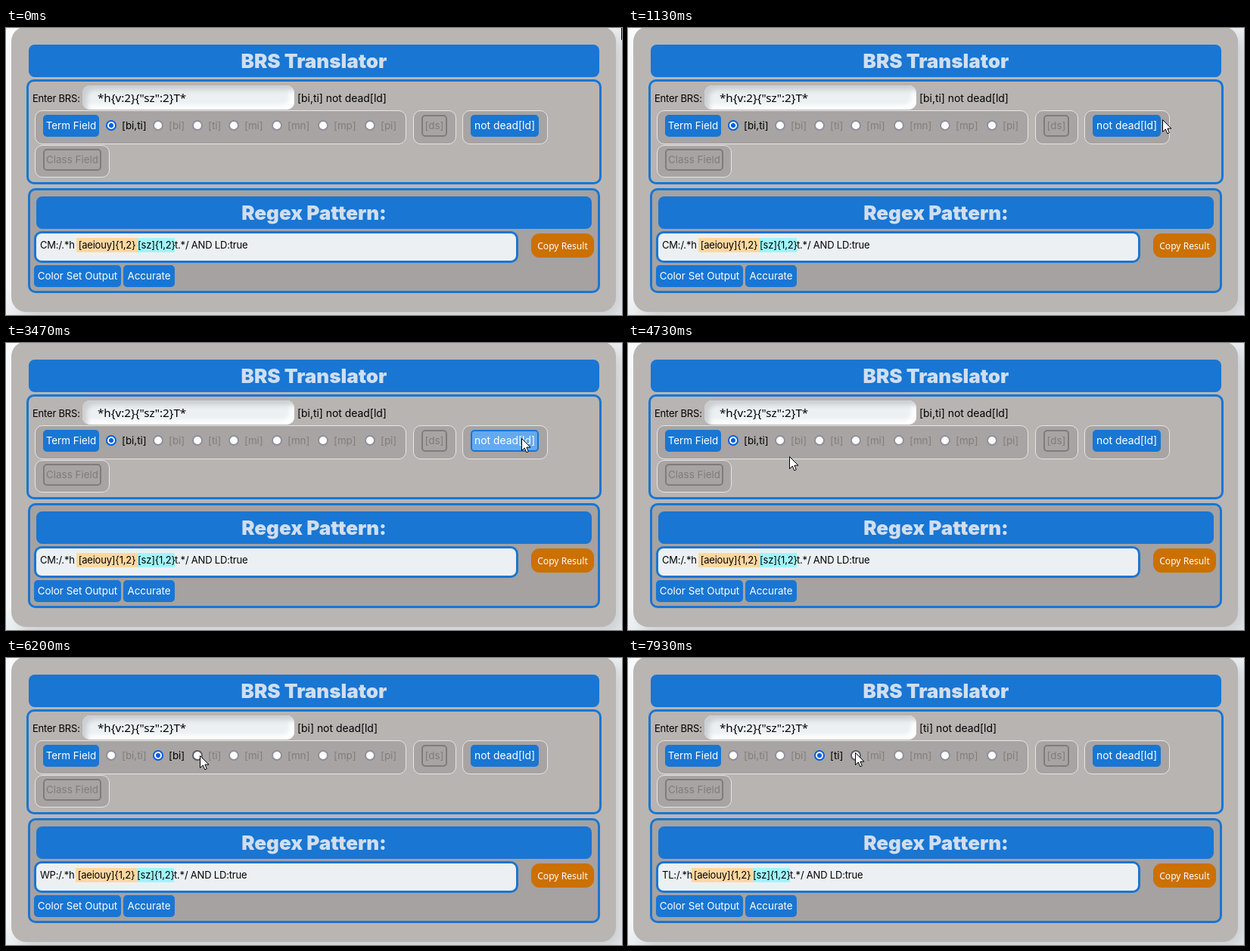
These frames come from a looping animation (814x380 px, 8000 ms). An HTML page:

```html
<!DOCTYPE html>
<html lang="en">
<head>
<meta charset="utf-8">
<title>BRS Translator</title>
<style>
html, body { margin: 0; width: 814px; height: 380px; overflow: hidden; background: #ecf0f3; }
#stage { position: relative; width: 814px; height: 380px; overflow: hidden; font: 13.4px/20px Inter, sans-serif; color: #000; }
#stage div { position: absolute; box-sizing: border-box; white-space: pre; }
.panel { background: #b9b5b3; border-radius: 20px; box-shadow: 10px 10px 20px #cbced1, -10px -10px 20px #fff; }
.title { background: #1976d3; border-radius: 8px; color: #d0deef; font-size: 26px; font-weight: 900; text-align: center; line-height: 43px; }
.section { border: 3px solid #1976d3; border-radius: 10px; background: #b8b4b2; }
.dark { background: #a5a2a1; }
.group { background: #a7a4a3; border: 1px solid #e6e5e5; border-radius: 10px; }
.button { background: #1976d3; border: 2px solid #1976d3; border-radius: 5px; color: #fff; text-align: center; line-height: 25px; }
.off { background: none; border-color: #7f7c7b; color: #7f7c7b; }
.input { background: #ecf0f3; border-radius: 10px; box-shadow: inset 6px 6px 6px #cbced1, inset -6px -6px 6px #fff; font: 15.2px/32px "Noto Sans", sans-serif; padding-left: 20px; }
.copy { background: #cc7000; border-radius: 11px; color: #fff; font: 12.1px/33px "Noto Sans", sans-serif; text-align: center; }
.wide { font-size: 13.9px; }
.result { background: #ecf0f3; }
.regex { font-size: 13px; letter-spacing: -.2px; }
.mark { text-align: center; line-height: 18px; }
.radio { border: 2px solid #8f8f9d; border-radius: 50%; background: #fff; }
svg { position: absolute; left: 0; top: 0; overflow: visible; }
</style>
</head>
<body>
<div id="stage"></div>
<script>
const stage = document.getElementById('stage');

function box(cls, x, y, w, h, text = '') {
  const el = document.createElement('div');
  el.className = cls;
  el.style.cssText = `left:${x}px;top:${y}px;width:${w}px;height:${h}px`;
  el.textContent = text;
  stage.append(el);
  return el;
}
const label = (x, y, text, cls = '') => box(cls, x, y, 300, 20, text);

box('panel', 7, -2, 799, 378);
box('title', 30, 22, 754, 43, 'BRS Translator');
box('section', 27, 68, 760, 139);
box('section dark', 29, 212, 756, 139);
label(35, 83, 'Enter BRS:', 'regex');
box('input', 101, 76, 280, 32, '*h{v:2}{"sz":2}T*');
const query = label(385, 83, '', 'wide');

box('group', 38, 109, 491, 45);
box('group', 538, 109, 57, 45);
box('group', 603, 109, 113, 45);
box('group', 38, 155, 99, 43);
box('button', 49, 115, 74, 29, 'Term Field');
box('button off', 549, 115, 34, 29, '[ds]');
const dead = box('button wide', 614, 115, 90, 29, 'not dead[ld]');
box('button off', 49, 160, 77, 29, 'Class Field');

const fields = ['bi,ti', 'bi', 'ti', 'mi', 'mn', 'mp', 'pi'];
const centers = [139, 201, 253, 301, 358, 419, 481];
const radios = centers.map(x => box('radio', x - 7, 122, 14, 14));
const names = centers.map((x, i) => label(x + 14, 119, `[${fields[i]}]`));

box('title', 40, 223, 734, 43, 'Regex Pattern:');
box('section result', 37, 269, 640, 42);
const vowels = box('regex mark', 0, 278, 81, 19, '[aeiouy]{1,2}');
const sibilants = box('regex mark', 0, 278, 49, 19, '[sz]{1,2}');
vowels.style.background = '#ffd8a0';
sibilants.style.background = '#9ff6fb';
const prefix = label(45, 277, '', 'regex');
const tail = label(0, 277, '', 'regex');
box('copy', 694, 272, 83, 32, 'Copy Result');
box('button', 37, 314, 115, 29, 'Color Set Output');
box('button', 155, 314, 68, 29, 'Accurate');

stage.insertAdjacentHTML('beforeend', `<svg width="13" height="20">
  <path d="M.5 .5V16.5L4.3 13L6.8 18.8L9.3 17.7L6.9 12.1H12Z" fill="#fff" stroke="#000"/></svg>`);
const cursor = stage.lastElementChild;

// Pointer stops: step (15 per second), x, y
const path = [
  [0, 813, -1], [6, 813, -1], [11, 762, 74], [17, 706, 121], [19, 688, 126],
  [20, 681, 126], [64, 681, 126], [68, 410, 142], [71, 213, 150], [77, 203, 128],
  [79, 203, 128], [84, 226, 127], [90, 253, 129], [94, 257, 129], [101, 293, 129],
  [109, 293, 129], [112, 309, 129], [116, 309, 129], [119, 300, 125], [120, 300, 125]
];

function pointerAt(step) {
  const i = path.findIndex(p => p[0] > step);
  const [a, b] = [path[i - 1], path[i]];
  const k = (step - a[0]) / (b[0] - a[0]);
  return [1, 2].map(n => Math.round(a[n] + (b[n] - a[n]) * k));
}

const codes = [['CM', 93], ['WP', 92], ['TL', 84]];

function render(time) {
  const step = Math.min(119, Math.floor((time % 8000 + 4) * .015));
  const [x, y] = pointerAt(step);
  const active = step < 29 || step >= 52;
  const chosen = step < 79 ? 0 : step < 94 ? 1 : 2;
  const [code, start] = codes[chosen];

  cursor.style.transform = `translate(${x}px,${y}px)`;
  const over = x >= 614 && x < 704 && y >= 115 && y < 144;
  dead.style.backgroundColor = over ? '#64a9f0' : '';
  dead.style.color = active ? '' : '#7f7c7b';

  query.textContent = `[${fields[chosen]}]` + (active ? ' not dead[ld]' : '');
  prefix.textContent = code + ':/.*h';
  tail.textContent = 't.*/' + (active ? ' AND LD:true' : '');
  vowels.style.left = start + 'px';
  sibilants.style.left = start + 81 + 'px';
  tail.style.left = start + 130 + 'px';

  radios.forEach((radio, i) => {
    const on = i === chosen;
    const hover = Math.hypot(x - centers[i], y - 129) < 7.5;
    radio.style.borderColor = on ? '#0060df' : hover ? '#5b5b66' : '';
    radio.style.backgroundImage = on ? 'radial-gradient(circle, #0060df 2.7px, #fff 3.4px)' : '';
    names[i].style.color = on ? '#000' : '#807d7c';
  });
}

function tick() {
  render(performance.now());
  requestAnimationFrame(tick);
}
tick();
</script>
</body>
</html>
```
